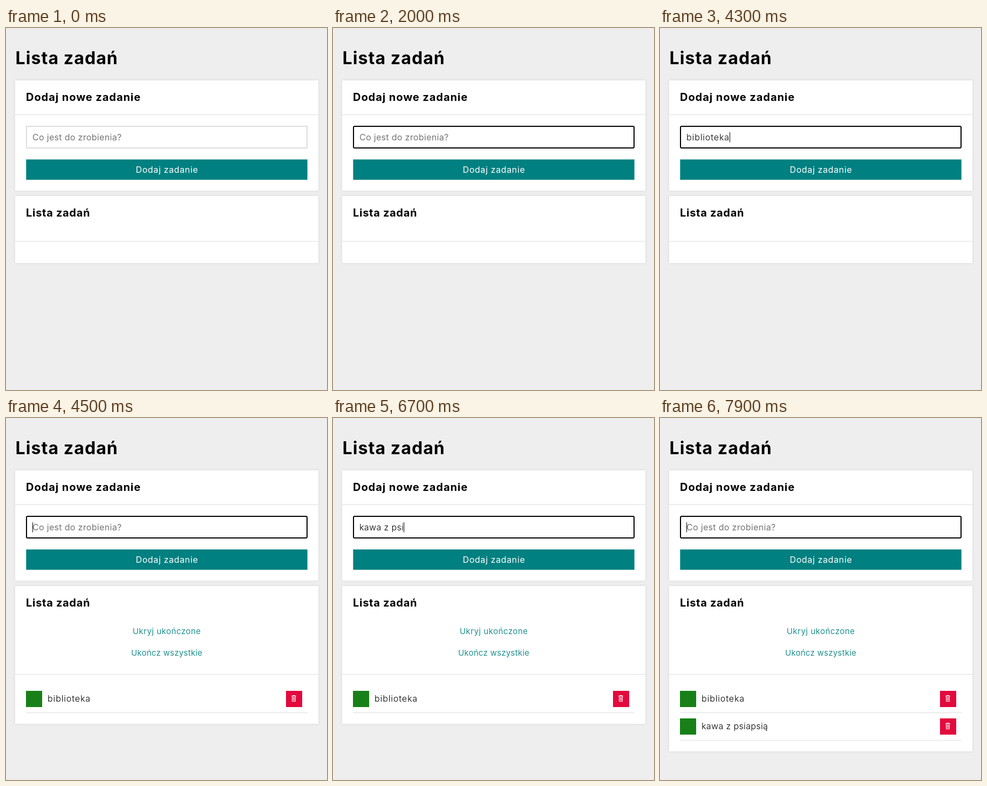
Write an HTML page that moves like this. It is 595 by 670 pixels and loops after 8 s.

```html
<!DOCTYPE html>
<html lang="pl">
<head>
<meta charset="utf-8">
<title>Lista zadań</title>
<style>
  html, body { margin: 0; width: 100%; height: 100%; overflow: hidden; background: #eee; }
  svg { display: block; }
  text { font: 400 16px Inter, "Open Sans", sans-serif; font-optical-sizing: none; white-space: pre; }
  .card { fill: #fff; filter: drop-shadow(0 0 2px #d6d6d6); }
  .line { fill: #ddd; }
  .h1 { font-size: 32px; font-weight: 700; letter-spacing: 1.1px; }
  .h2 { font-size: 20px; font-weight: 700; letter-spacing: .7px; }
  .hint { fill: #757575; letter-spacing: .32px; }
  .entry { font-weight: 300; fill: #000; }
  .mid { text-anchor: middle; }
  .link { font-size: 15px; fill: #209090; }
  .bin { fill: none; stroke: #fff; }
</style>
</head>
<body>
<svg width="595" height="670" viewBox="0 0 595 670">
  <defs>
    <g id="buttons">
      <rect x="37" y="505" width="30" height="30" fill="#188018"/>
      <rect x="519" y="505" width="30" height="30" fill="#e30a3d"/>
      <path class="bin" d="M529 514.5h9M531.5 513.5h4M530.5 515v9.5h6v-9.5M532.5 516v7M534.5 516v7"/>
      <rect class="line" x="37" y="545" width="522" height="1"/>
    </g>
  </defs>

  <text class="h1" x="17.5" y="67">Lista zadań</text>

  <rect class="card" x="17" y="97" width="562" height="204"/>
  <text class="h2" x="37" y="135" style="letter-spacing:.95px">Dodaj nowe zadanie</text>
  <rect class="line" x="17" y="160" width="562" height="1"/>
  <rect id="field" x="38" y="182" width="520" height="40" fill="#fff" stroke-width="2"/>
  <text id="hint" class="hint" x="49" y="207.5">Co jest do zrobienia?</text>
  <text id="typed" class="entry" x="49" y="207.5"></text>
  <rect id="caret" y="193" width="1" height="18.5"/>
  <rect x="37.3" y="243.3" width="521.4" height="37.6" fill="#008080"/>
  <text class="mid" x="298.3" y="267.5" fill="#fff" style="letter-spacing:.62px">Dodaj zadanie</text>

  <rect id="list" class="card" x="17" y="311" width="562"/>
  <text class="h2" x="37" y="349">Lista zadań</text>
  <rect id="divider" class="line" x="17" width="562" height="1"/>
  <g id="links">
    <text class="mid link" x="298" y="399.5" style="letter-spacing:.5px">Ukryj ukończone</text>
    <text class="mid link" x="298" y="439.5" style="letter-spacing:.25px">Ukończ wszystkie</text>
  </g>
  <g id="task1">
    <use href="#buttons"/>
    <text class="entry" x="77" y="525" style="letter-spacing:.88px">biblioteka</text>
  </g>
  <g id="task2">
    <use href="#buttons" y="51"/>
    <text class="entry" x="77" y="576" style="letter-spacing:.38px">kawa z psiapsią</text>
  </g>
</svg>
<script>
  const LOOP = 8000, FOCUS = 1400;
  // Each word: its letter spacing, when each key lands, and when it is added.
  const words = [
    { text: "biblioteka", gap: .88, added: 4500,
      keys: [2200, 2300, 2400, 2900, 3400, 3500, 3800, 4000, 4200, 4300] },
    { text: "kawa z psiapsią", gap: .38, added: 7900,
      keys: [5300, 5400, 5600, 5800, 5900, 6000, 6100, 6500, 6600, 6700, 6800, 7000, 7200, 7300, 7700] }
  ];
  // Blink pauses of the caret in the empty field.
  const blinks = [[2000, 2200], [4800, 5300]];

  const $ = id => document.getElementById(id);
  const show = (id, on) => { $(id).style.display = on ? "" : "none"; };
  const set = (id, attrs) => {
    for (const key in attrs) $(id).setAttribute(key, attrs[key]);
  };

  function draw(t) {
    const focused = t >= FOCUS;
    const done = words.filter(w => t >= w.added).length;
    const word = words[done];
    const count = word ? word.keys.filter(k => t >= k).length : 0;
    const typed = $("typed");

    typed.textContent = word ? word.text.slice(0, count) : "";
    typed.style.letterSpacing = (word ? word.gap : 0) + "px";
    show("hint", !count);

    set("field", { stroke: focused ? "#000" : "#ddd", rx: focused ? 2 : 0 });
    const width = count ? typed.getComputedTextLength() : 0;
    set("caret", { x: Math.round(49 + width) });
    show("caret", focused && !blinks.some(([from, to]) => t >= from && t < to));

    set("list", { height: done ? 204 + 51 * done : 124 });
    set("divider", { y: done ? 474 : 394.5 });
    show("links", done > 0);
    show("task1", done > 0);
    show("task2", done > 1);
  }

  const start = performance.now();
  function tick(now) {
    draw(Math.max(0, now - start) % LOOP);
    requestAnimationFrame(tick);
  }
  draw(0);
  requestAnimationFrame(tick);
</script>
</body>
</html>
```
